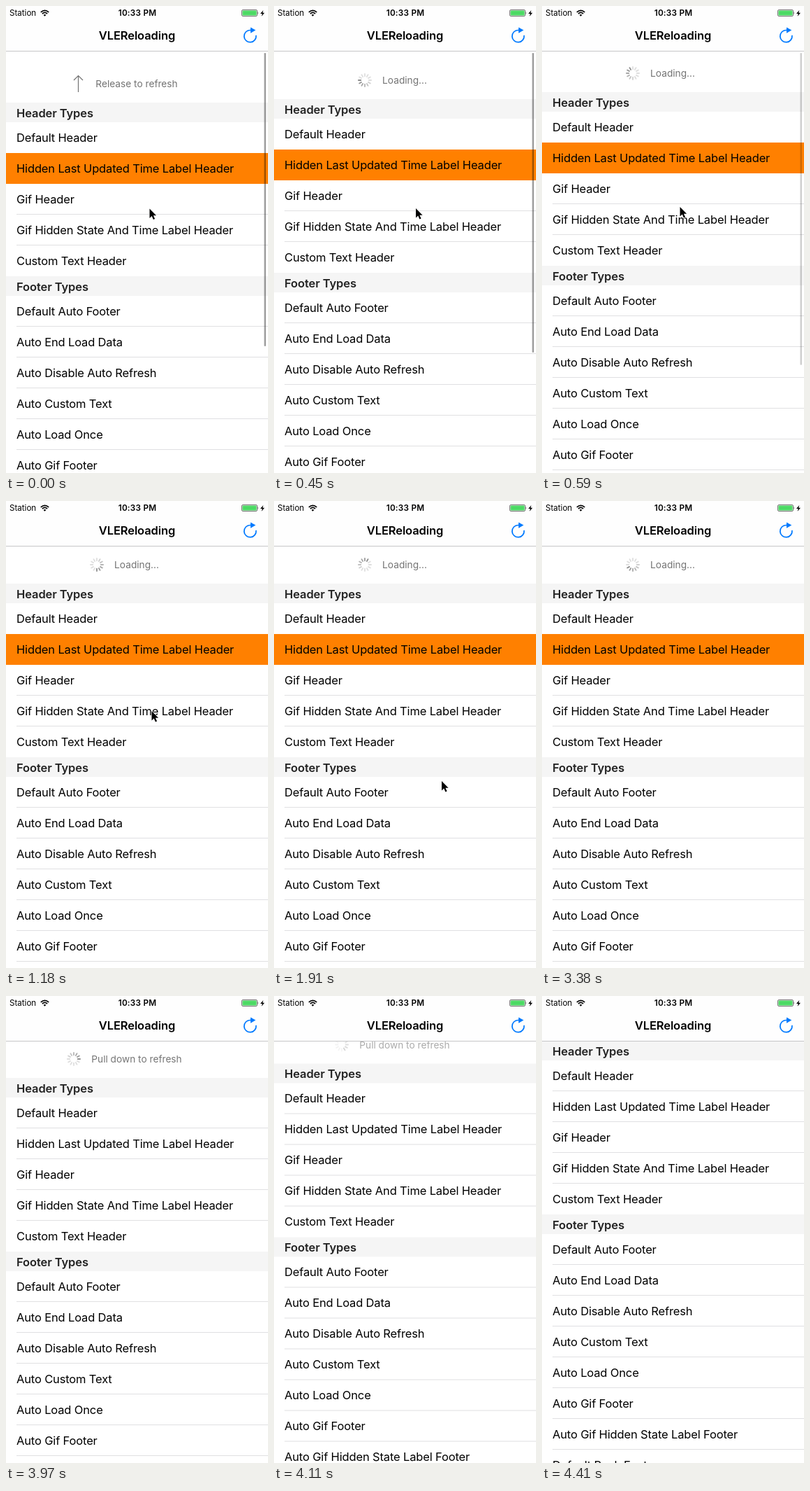
Animation, 375 px wide and 667 px high, one loop 5.01 s. Source, as an HTML page:

```html
<!DOCTYPE html>
<html lang="en">
<head>
<meta charset="utf-8">
<title>Pull to refresh</title>
<style>
  html, body { margin: 0; width: 100%; height: 100%; overflow: hidden; background: #fff; }
  svg { display: block; width: 375px; height: 667px; }
  text { font: 400 16.5px Inter, Roboto, sans-serif; letter-spacing: -.15px; fill: #000; }
  .bold { font-weight: 600; letter-spacing: -.1px; }
  .section { fill: #222; }
  .state { font-size: 13.7px; letter-spacing: 0; fill: #737373; }
  .status { font-size: 11.6px; letter-spacing: 0; }
  .clock { font-size: 11.8px; letter-spacing: .2px; }
  .mid { text-anchor: middle; }
</style>
</head>
<body>
<svg id="stage" viewBox="0 0 375 667">
  <rect width="375" height="667" fill="#fff"/>
  <g id="table"></g>
  <g id="pull">
    <text id="state" class="state mid" x="187" y="5"></text>
    <path id="arrow" d="M103.5 12V-11.5M97 -5L103.5 -11.5L110 -5" fill="none" stroke="#737373" stroke-width="1.2"/>
    <g id="spinner"></g>
  </g>
  <rect id="bar" x="369.5" y="67" width="2.5" rx="1.25"/>
  <g id="nav">
    <rect width="375" height="64" fill="#fefefe"/>
    <rect y="64" width="375" height="1" fill="#c6c6c8"/>
    <text class="status" x="5" y="14.3">Station</text>
    <path d="M49.8 8.8Q55.5 3.8 61.2 8.8M51.9 11Q55.5 7.9 59.1 11" fill="none" stroke="#000" stroke-width="1.7"/>
    <path d="M53.6 12.7Q55.5 11.2 57.4 12.7L55.5 14.7Z"/>
    <text class="clock bold mid" x="188" y="14.3">10:33 PM</text>
    <rect x="337.5" y="5.5" width="22" height="9" rx="1.6" fill="#fff" stroke="#333" stroke-width=".7"/>
    <rect x="338.5" y="6.5" width="20" height="7" rx=".6" fill="#4cd964"/>
    <path d="M360.6 8.2Q362.2 10 360.6 11.8Z" fill="#333"/>
    <path d="M368.3 6L364 10.9H366.7L365.7 14.8L370 9.7H367.3Z"/>
    <text class="bold mid" x="187.5" y="48.3">VLEReloading</text>
    <path d="M357.9 41.8A8.6 8.6 0 1 1 349.3 34.5H351" fill="none" stroke="#007aff" stroke-width="1.75"/>
    <path d="M350 30.5L357.3 34.6L350 38.7Z" fill="#007aff"/>
  </g>
  <path id="cursor" d="M0 0V13.5L3.2 10.6L5.4 15.6L7.6 14.6L5.4 9.8H9.6Z" stroke="#fff" stroke-width="1.4" paint-order="stroke"/>
</svg>
<script>
const LOOP = 5010, TOP = 64, PULL = 54, DRAG = 20, ROW = 44, HEAD = 28;
const $ = id => document.getElementById(id);

function add(parent, tag, attrs, label) {
  const el = document.createElementNS('http://www.w3.org/2000/svg', tag);
  for (const key in attrs) el.setAttribute(key, attrs[key]);
  if (label) el.textContent = label;
  return parent.appendChild(el);
}

const sections = [
  ['Header Types', 'Default Header', 'Hidden Last Updated Time Label Header', 'Gif Header',
    'Gif Hidden State And Time Label Header', 'Custom Text Header'],
  ['Footer Types', 'Default Auto Footer', 'Auto End Load Data', 'Auto Disable Auto Refresh',
    'Auto Custom Text', 'Auto Load Once', 'Auto Gif Footer',
    'Auto Gif Hidden State Label Footer', 'Default Back Footer']
];

const table = $('table');
const lines = add(table, 'g', { fill: '#e0e0e2' });
const selected = add(table, 'g', {});
add(selected, 'rect', { y: HEAD + ROW - 1, width: 375, height: 2, fill: '#fff' });
add(selected, 'rect', { y: HEAD + ROW, width: 375, height: ROW, fill: '#ff8000' });

let y = 0;
for (const [title, ...rows] of sections) {
  add(table, 'rect', { y, width: 375, height: HEAD, fill: '#f5f5f5' });
  add(table, 'text', { x: 15, y: y + 20.5, class: 'bold section' }, title);
  y += HEAD;
  rows.forEach((label, i) => {
    add(table, 'text', { x: 15, y: y + 27.5 }, label);
    y += ROW;
    if (i < rows.length - 1) add(lines, 'rect', { x: 15, y: y - 1, width: 360, height: 1 });
  });
}

const spokes = Array.from({ length: 12 }, (_, i) => add($('spinner'), 'rect', {
  x: -.9, y: -10, width: 1.8, height: 5.2, rx: .9, fill: '#777', transform: `rotate(${i * 30})`
}));

// Screen updates, in ms: a rest, short ticks, a rest.
const ticks = [0, 450];
for (const d of '14 15 15 14 15 15 15 14 15 15 14 15 15 15 14 15 15 14 15 14 15 15 14 15 14 15 15'.split(' '))
  ticks.push(ticks[ticks.length - 1] + d * 10);

// Pointer path: time, x, y
const path = [
  [0, 205.5, 289.5], [450, 203, 289], [590, 197.5, 287], [740, 199, 289], [1180, 208.5, 300],
  [1480, 214, 306], [1770, 240, 400], [2060, 270, 560], [2210, 283, 645], [2360, 290, 700]
];

function pointAt(t) {
  const i = path.findIndex(p => p[0] > t);
  if (i < 0) return path[path.length - 1].slice(1);
  const a = path[i - 1], b = path[i], k = (t - a[0]) / (b[0] - a[0]);
  return [a[1] + (b[1] - a[1]) * k, a[2] + (b[2] - a[2]) * k];
}

function ease(t, start) {
  const k = Math.min(1, Math.max(0, (t - start) / 400));
  return k * k * (3 - 2 * k);
}

const move = (el, x, y) => el.setAttribute('transform', `translate(${x} ${y})`);
const show = (el, on) => { el.style.display = on ? '' : 'none'; };

function draw(t) {
  const loading = t >= 450, done = t >= 3970;
  const settle = loading ? ease(t, 320) : 0;
  const close = done ? ease(t, 3937) : 0;
  const top = Math.round((TOP + PULL + DRAG * (1 - settle) - PULL * close) * 2) / 2;

  move(table, 0, top);
  move($('pull'), 0, top - PULL / 2);
  $('pull').style.opacity = Math.min(1, (top - TOP) / PULL);
  $('state').textContent = done ? 'Pull down to refresh' : loading ? 'Loading...' : 'Release to refresh';
  show($('arrow'), !loading);
  show($('spinner'), loading);
  show(selected, !done);

  move($('spinner'), done ? 97 : 130, 0);
  $('spinner').style.opacity = 1 - close;
  const head = Math.floor((t - 2650) * 12 / 1000);
  spokes.forEach((s, i) => {
    const age = ((head - i) % 12 + 12) % 12;
    s.style.opacity = Math.max(.24, .85 - age * .1);
  });

  $('bar').setAttribute('height', 419 + (TOP + PULL + DRAG - top) * 1.78);
  $('bar').style.opacity = t < 590 ? .38 : Math.max(0, .19 - (t - 590) * .001);
  move($('cursor'), ...pointAt(t));
}

let last = -1;
function frame() {
  const now = performance.now() % LOOP;
  const t = ticks.filter(v => v <= now).pop();
  if (t !== last) draw(last = t);
  requestAnimationFrame(frame);
}
frame();
</script>
</body>
</html>
```
